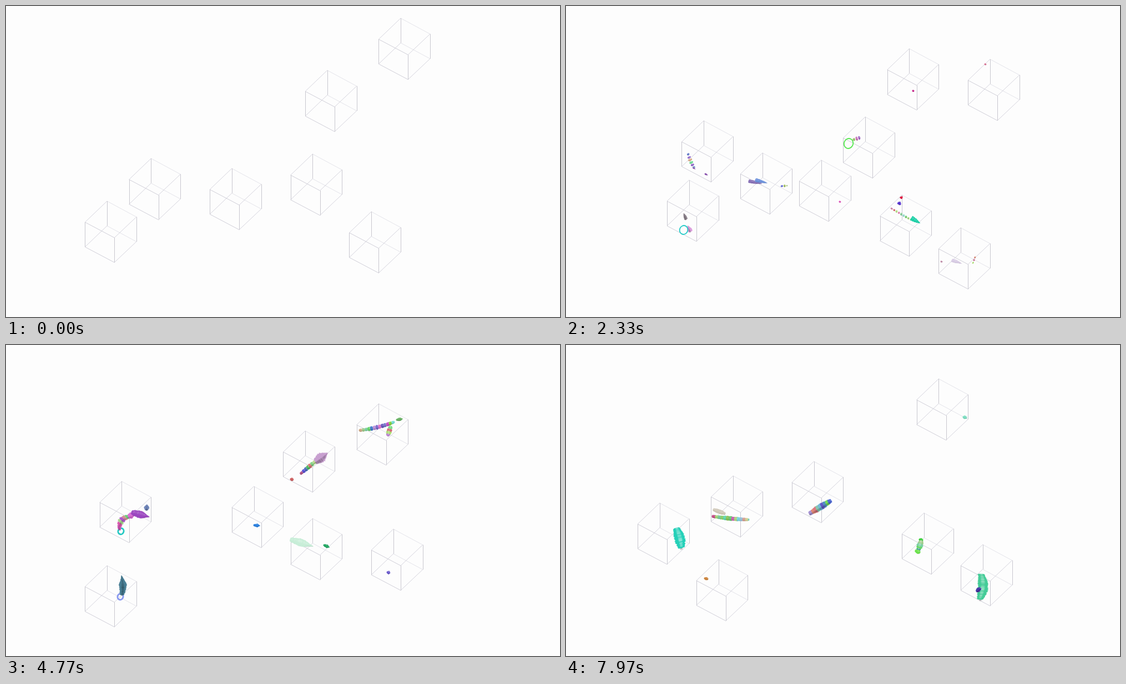
An HTML page with a canvas that plays this animation: 998 px wide and 561 px high, repeating every 8 s.

```html
<!DOCTYPE html>
<html lang="en">
<head>
<meta charset="utf-8">
<title>Growing segments</title>
<style>
html, body { margin: 0; width: 100%; height: 100%; overflow: hidden; background: #fdfdfd; }
canvas { display: block; width: 998px; height: 561px; }
</style>
</head>
<body>
<canvas id="stage" width="998" height="561"></canvas>
<script>
const ctx = document.getElementById('stage').getContext('2d');
const PAPER = '#fdfdfd';
const SCENE_MS = 2000;
const COLUMN = 13.225;
const EDGE = 44.6;

const clamp = v => Math.max(0, Math.min(1, v));

function noise(n) {
  const s = Math.sin(n * 12.9898) * 43758.5453;
  return s - Math.floor(s);
}

function disc(x, y, rx, ry, angle, colour) {
  ctx.fillStyle = colour;
  ctx.beginPath();
  ctx.ellipse(x, y, rx, ry, angle, 0, Math.PI * 2);
  ctx.fill();
}

function line(x1, y1, x2, y2, colour) {
  ctx.strokeStyle = colour;
  ctx.beginPath();
  ctx.moveTo(x1, y1);
  ctx.lineTo(x2, y2);
  ctx.stroke();
}

// A wire cube, placed by lattice column and the height of its back corner.
const cube = (column, y) => () => {
  const x = 182 + column * COLUMN;
  const corners = [[0, 0], [4, 28.5], [1, 66], [-3, 38]];
  const tints = ['#e4e4ea', '#d6d5de', '#d0cfd8', '#d6d5de'];
  ctx.lineWidth = 1;
  corners.forEach(([dx, dy], i) => {
    const [ex, ey] = corners[(i + 1) % 4];
    for (const h of [y, y + EDGE]) line(x + dx * COLUMN, h + dy, x + ex * COLUMN, h + ey, tints[i]);
    const side = Math.round(x + dx * COLUMN) + .5;
    line(side, y + dy, side, y + dy + EDGE, '#c8c7cf');
  });
};

// Sweeps cross-sections along a bent line; style(u, length) gives colour and fullness at u.
function sweep(x1, y1, x2, y2, radius, bend, style) {
  const dx = x2 - x1, dy = y2 - y1, length = Math.hypot(dx, dy), steps = Math.ceil(length * 1.2);
  const angle = Math.atan2(dy, dx);
  for (let k = 0; k <= steps; k++) {
    const u = k / steps, arc = 4 * u * (1 - u) * bend / length;
    const { colour, full } = style(u, length);
    if (full <= 0) continue;
    const grain = noise(x1 + y1 * 3 + k * 7);
    const r = radius * (.6 + .4 * Math.sin(Math.PI * u)) * (.85 + grain * .25) * full;
    const x = x1 + dx * u - dy * arc, y = y1 + dy * u + dx * arc;
    disc(x, y, Math.min(1.5, r), r, angle, colour);
    disc(x, y + r * .55, 1, r * .4, angle, `rgba(0,0,0,${.06 + grain * .08})`);
    disc(x, y - r * .3, 1, r * .4, angle, `rgba(255,255,255,${grain * .3})`);
  }
}

// One colour, growing to a tapered tip.
const solid = (colour, x1, y1, x2, y2, radius, bend = 0) => time => {
  const front = 1.8 * time / 1300;
  sweep(x1, y1, x2, y2, radius, bend, u => ({ colour, full: clamp((front - u) * 2) }));
};

// Short bands in seeded hues, each closing its own gap.
const banded = (x1, y1, x2, y2, radius, bend = 0) => time => {
  const growth = clamp(time / 1000);
  sweep(x1, y1, x2, y2, radius, bend, (u, length) => {
    const place = u * length / 5, band = Math.floor(place);
    const seed = x1 + band * 3;
    const colour = `hsl(${noise(seed) * 360},${35 + noise(seed + 1) * 30}%,${52 + noise(seed + 2) * 20}%)`;
    return { colour, full: place - band <= growth ? clamp(.4 + growth) * clamp(growth * 20) : 0 };
  });
};

// An open cross-section that thickens inwards.
const ring = (colour, x, y, radius) => time => {
  if (time < 30) return;
  const growth = clamp(time / 1500);
  ctx.lineWidth = 1.5 + radius * .75 * growth ** 2;
  const r = radius - ctx.lineWidth / 2;
  ctx.strokeStyle = colour;
  ctx.beginPath();
  ctx.ellipse(x, y, r * .9, r, .4, 0, Math.PI * 2);
  ctx.stroke();
};

const speck = (colour, x, y) => solid(colour, x - 2, y, x + 3, y + 1, 3);

const scenes = [
  [
    cube(40, 22), cube(30, 116), cube(28, 267), cube(6, 275), cube(17, 293), cube(0, 352), cube(36, 371),
    speck('mediumturquoise', 723, 129), speck('limegreen', 747, 106),
    banded(580, 188, 604, 165, 4), banded(604, 162, 624, 155, 5), ring('thistle', 576, 193, 7),
    solid('royalblue', 259, 309, 269, 313, 4),
    banded(389, 325, 413, 320, 4), solid('thistle', 410, 321, 452, 332, 6, -4),
    solid('#8ff04a', 514, 350, 556, 361, 6), banded(558, 357, 580, 362, 5),
    solid('#14b5b5', 204, 406, 213, 417, 7), solid('royalblue', 204, 413, 212, 418, 4),
    solid('#8cf060', 666, 424, 696, 457, 9), banded(673, 453, 697, 458, 4), banded(643, 434, 668, 437, 2)
  ],
  [
    cube(33, 77), cube(44, 96), cube(27, 200), cube(5, 207), cube(13, 265),
    cube(21, 278), cube(3, 314), cube(32, 341), cube(40, 400),
    speck('mediumvioletred', 627, 153), speck('palevioletred', 757, 105), speck('#e04ab8', 495, 353),
    ring('#5ae854', 509, 248, 10), banded(518, 241, 531, 237, 5),
    banded(220, 267, 231, 292, 5, 1), solid('#8a50b0', 229, 292, 240, 298, 2), solid('#8a50b0', 251, 303, 261, 308, 3),
    solid('#8972b8', 330, 316, 384, 326, 6), solid('#6c91dc', 342, 314, 389, 326, 6), banded(388, 325, 398, 324, 3),
    solid('#8f858f', 216, 384, 207, 361, 6), solid('plum', 224, 406, 213, 384, 8), ring('#25ccc8', 212, 404, 9),
    solid('crimson', 604, 345, 606, 351, 5), solid('#5d3bd6', 600, 357, 604, 349, 7),
    banded(586, 365, 622, 386, 3), solid('#1fd0a8', 623, 383, 657, 403, 8),
    solid('#d9cde5', 696, 459, 733, 476, 6, -2), banded(733, 464, 738, 450, 2), speck('#c08aa8', 678, 461)
  ],
  [
    cube(37, 106), cube(27, 155), cube(2, 246), cube(20, 255), cube(28, 313), cube(39, 332), cube(0, 398),
    banded(637, 154, 699, 139, 4, 2), solid('#6cb468', 704, 135, 715, 133, 3), banded(693, 147, 688, 163, 5),
    banded(531, 232, 561, 207, 4), solid('#c8a0d0', 558, 210, 579, 195, 9), speck('indianred', 515, 242),
    ring('#25c8c2', 207, 336, 7), banded(204, 332, 224, 309, 6, -7),
    solid('orchid', 221, 309, 231, 306, 6), solid('#9c48c0', 227, 302, 258, 310, 7), solid('#7389bc', 253, 297, 254, 288, 5),
    solid('#2a80e0', 447, 325, 458, 326, 3),
    solid('#c8eed8', 513, 351, 553, 363, 7), solid('#1fa560', 573, 361, 583, 365, 3),
    speck('slateblue', 689, 410),
    ring('#8898f0', 206, 454, 7), solid('#4a7f95', 209, 450, 208, 416, 7, 2)
  ],
  [
    cube(37, 61), cube(20, 210), cube(9, 236), cube(-1, 285), cube(35, 303), cube(7, 387), cube(43, 360),
    speck('#7addc0', 718, 130), banded(439, 304, 477, 281, 6),
    banded(264, 309, 329, 315, 4, 1), solid('#d0c8b8', 266, 297, 286, 304, 4),
    solid('#25d0b8', 199, 331, 208, 365, 10, -1),
    speck('limegreen', 639, 351), banded(640, 354, 635, 369, 6), solid('#6ce24c', 630, 371, 637, 374, 4),
    speck('peru', 252, 421),
    solid('#45cc98', 748, 414, 746, 458, 10, -4), solid('#4c3aa8', 740, 444, 746, 439, 4)
  ]
];

function draw(now) {
  const scene = scenes[Math.floor(now / SCENE_MS) % scenes.length];
  ctx.fillStyle = PAPER;
  ctx.fillRect(0, 0, 998, 561);
  scene.forEach(part => part(now % SCENE_MS));
}

const start = performance.now();
function tick() {
  draw(performance.now() - start);
  requestAnimationFrame(tick);
}
tick();
</script>
</body>
</html>
```
